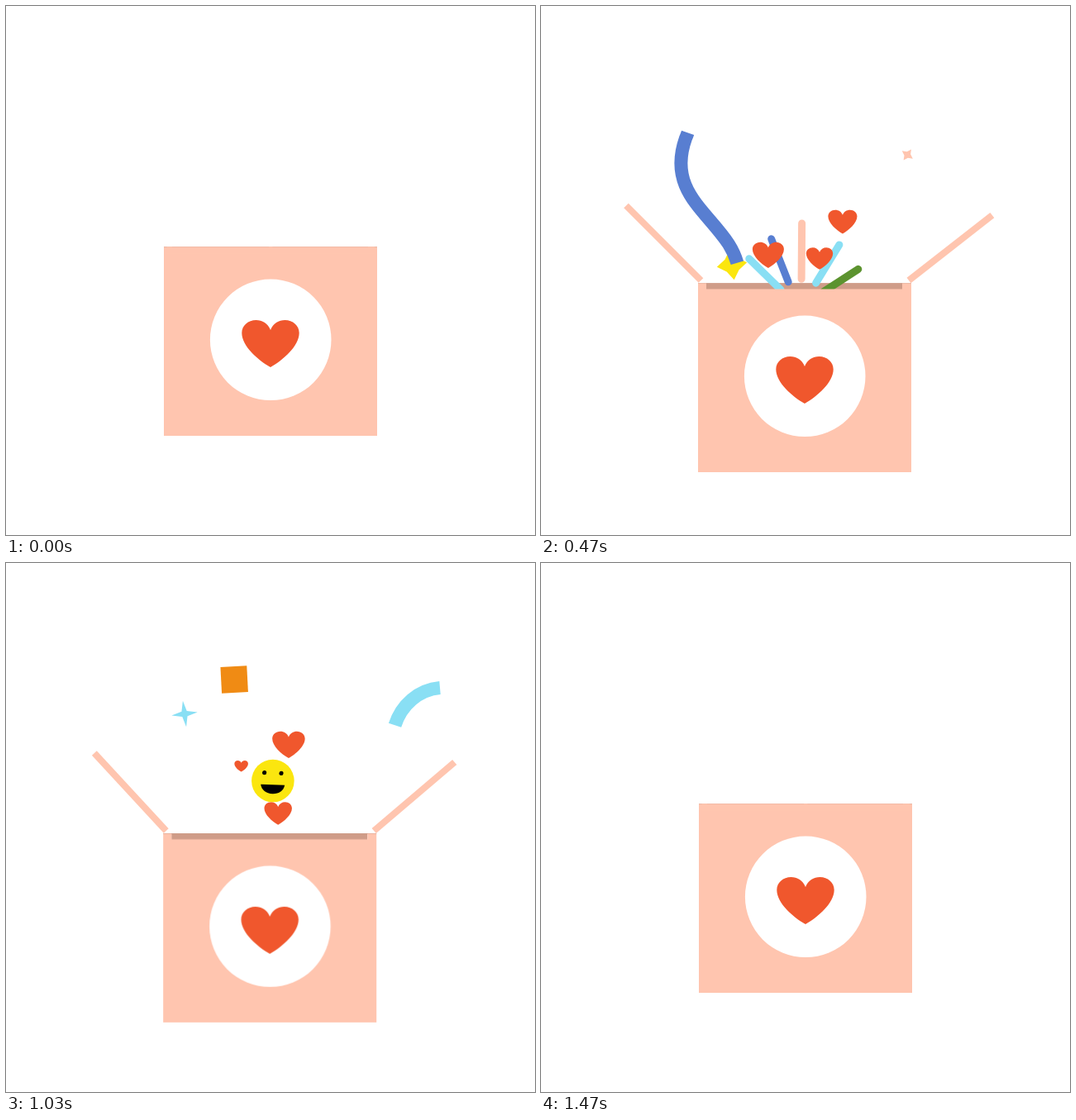
An HTML page for the animation above (1530 ms loop, 640 by 640 pixels).

```html
<!DOCTYPE html>
<html lang="en">
<head>
<meta charset="utf-8">
<title>Gift box</title>
<style>
html, body { margin: 0; height: 100%; overflow: hidden; background: #fff; }
svg { display: block; width: 100vw; height: 100vh; }
svg * { animation: 1530ms linear infinite; }

.red { fill: #f0572d; }
.peach { fill: #ffc5af; }
.cyan { fill: #89dff4; }
.yellow { fill: #fbe60f; }
.dark { fill: #cf9c88; }

/* box and flaps */
.box { animation-name: box; }
.left { animation-name: left; }
.right { animation-name: right; }
@keyframes box {
  0%, 1.3% { translate: 0 0; animation-timing-function: cubic-bezier(.455, .03, .515, .955); }
  26.8% { translate: -1px 44px; }
  62.1% { translate: -1px 44px; animation-timing-function: cubic-bezier(.3, .2, .7, .7); }
  69.9% { translate: -.7px 31.5px; }
  76.5% { translate: -.5px 21px; animation-timing-function: cubic-bezier(.3, .4, .6, 1); }
  94.1%, 100% { translate: 0 0; }
}
@keyframes left {
  0%, 5.6% { translate: 194.5px 295.3px; rotate: 0deg; animation-timing-function: cubic-bezier(.455, .03, .515, .955); }
  27.2% { translate: 194.5px 288px; rotate: -135deg; }
  64.1% { translate: 194.5px 288px; rotate: -135deg; animation-timing-function: cubic-bezier(.4, 0, .7, .55); }
  76.5% { translate: 195px 289.5px; rotate: -107.3deg; animation-timing-function: cubic-bezier(.35, .19, .5, 1); }
  95.4%, 100% { translate: 194.5px 295.3px; rotate: 0deg; }
}
@keyframes right {
  0%, 5.6% { translate: 446px 295.3px; rotate: 0deg; animation-timing-function: cubic-bezier(.455, .03, .515, .955); }
  27.2% { translate: 446px 288px; rotate: 142deg; }
  64.1% { translate: 446px 288px; rotate: 142deg; animation-timing-function: cubic-bezier(.4, 0, .7, .55); }
  76.5% { translate: 446px 289.5px; rotate: 112.8deg; animation-timing-function: cubic-bezier(.35, .19, .5, 1); }
  95.4%, 100% { translate: 446px 295.3px; rotate: 0deg; }
}

/* floating hearts */
.h1 { animation-name: h1; }
.h2 { animation-name: h2; }
.h3 { animation-name: h3; }
.h4 { animation-name: h4; }
.h5 { animation-name: h5; }
@keyframes h1 {
  0%, 7.2% { translate: 358.5px 322px; scale: 0; }
  11.1% { translate: 358.5px 302px; scale: .385; animation-timing-function: ease-out; }
  21.6% { translate: 358.5px 281px; scale: .573; }
  43.8% { translate: 374px 233px; scale: .41; }
  53.6%, 100% { translate: 380px 214px; scale: 0; }
}
@keyframes h2 {
  0%, 15% { translate: 272px 352px; scale: 0; animation-timing-function: ease-out; }
  21.6% { translate: 272px 317px; scale: .54; }
  43.8% { translate: 279px 279px; scale: .56; }
  60.8% { translate: 288px 255px; scale: .39; }
  76.5% { translate: 280px 233px; scale: .03; }
  77.8%, 100% { translate: 280px 232px; scale: 0; }
}
@keyframes h3 {
  0%, 23.5% { translate: 337px 355px; scale: 0; animation-timing-function: ease-out; }
  32.7% { translate: 337px 302px; scale: .5; }
  43.8% { translate: 337px 271.5px; scale: .19; }
  47.1%, 100% { translate: 337px 264px; scale: 0; }
}
@keyframes h4 {
  0%, 36.6% { translate: 308px 378px; scale: 0; }
  43.8% { translate: 317px 336.5px; scale: .6; animation-timing-function: cubic-bezier(.3, .4, .7, .9); }
  60.8% { translate: 333px 238px; scale: .575; animation-timing-function: ease-out; }
  76.5% { translate: 348px 207.5px; scale: .565; animation-timing-function: ease-in; }
  87.6%, 100% { translate: 354px 190px; scale: 0; }
}
@keyframes h5 {
  0%, 52.3% { translate: 325px 375px; scale: 0; animation-timing-function: ease-out; }
  60.8% { translate: 329px 313px; scale: .585; }
  76.5% { translate: 329.5px 289px; scale: .34; }
  82.4%, 100% { translate: 329.5px 282px; scale: 0; }
}

.smile { animation-name: smile; }
@keyframes smile {
  0%, 33% { translate: 315px 390px; }
  43.8% { translate: 319px 288.5px; animation-timing-function: ease-out; }
  56.2% { translate: 323px 245px; animation-timing-function: ease-in; }
  60.8% { translate: 325px 248px; animation-timing-function: cubic-bezier(.4, .15, .7, .6); }
  76.5% { translate: 317.5px 303px; }
  84.3%, 100% { translate: 314px 370px; }
}

/* stars and square */
.s1 { translate: 216px 182.5px; animation-name: s1; }
.s2 { animation-name: s2; }
.s3 { translate: 231px 313px; animation-name: s3; }
.square { animation-name: square; }
@keyframes s1 {
  0%, 30.7% { scale: 0; rotate: -40deg; }
  43.8% { scale: .8; rotate: -21deg; animation-timing-function: ease-out; }
  60.8% { scale: 1; rotate: -13deg; }
  76.5% { scale: .04; rotate: 0deg; }
  77.8%, 100% { scale: 0; rotate: 0deg; }
}
@keyframes s2 {
  0%, 28.1% { translate: 443px 180px; scale: 0; rotate: 40deg; }
  37.3% { translate: 444px 180px; scale: .95; rotate: 25deg; }
  43.8% { translate: 445px 179.5px; scale: 1; rotate: 18deg; }
  60.8% { translate: 448px 179px; scale: .4; rotate: 0deg; }
  65.4%, 100% { translate: 448px 179px; scale: 0; rotate: -5deg; }
}
@keyframes s3 {
  0%, 19% { scale: 0; rotate: 10deg; }
  21.6% { scale: .26; rotate: 5deg; }
  34.6% { scale: 1; rotate: -14deg; }
  43.8% { scale: 1; rotate: -26deg; }
  54.2%, 100% { scale: 0; rotate: -40deg; }
}
@keyframes square {
  0%, 47.1% { translate: 271px 141px; scale: 0; rotate: -58deg; }
  60.8% { translate: 274.5px 141px; scale: 1; rotate: -21deg; }
  76.5% { translate: 278.5px 141px; scale: 1.1; rotate: 22deg; }
  82.4% { translate: 279.5px 141px; scale: 1.2; rotate: 38deg; }
  91.5%, 100% { translate: 281px 141px; scale: 0; rotate: 60deg; }
}

/* trimmed strokes */
.trim path { fill: none; stroke-dasharray: 0 3; }
.rays path { stroke-width: 9; stroke-linecap: round; animation-name: ray; }
.ribbons path { stroke-width: 16; }
.ribbons .r1 { animation-name: r1; }
.ribbons .r2 { animation-name: r2; }
@keyframes ray {
  0%, 19.6% { stroke-dasharray: 0 3; stroke-dashoffset: 0; opacity: 0; animation-timing-function: step-end; }
  19.7% { stroke-dasharray: 0 3; stroke-dashoffset: 0; opacity: 1; }
  21.6% { stroke-dasharray: .09 3; stroke-dashoffset: 0; }
  29.4% { stroke-dasharray: .5 3; stroke-dashoffset: -.05; }
  36.6% { stroke-dasharray: .5 3; stroke-dashoffset: -.4; }
  43.8% { stroke-dasharray: .25 3; stroke-dashoffset: -.75; }
  52.3% { stroke-dasharray: 0 3; stroke-dashoffset: -1; opacity: 1; animation-timing-function: step-start; }
  52.4%, 100% { stroke-dasharray: 0 3; stroke-dashoffset: -1; opacity: 0; }
}
@keyframes r1 {
  0%, 19% { stroke-dasharray: 0 3; stroke-dashoffset: 0; }
  21.6% { stroke-dasharray: .174 3; stroke-dashoffset: 0; }
  28.1% { stroke-dasharray: .5 3; stroke-dashoffset: 0; }
  34.6% { stroke-dasharray: .58 3; stroke-dashoffset: -.25; }
  39.9% { stroke-dasharray: .54 3; stroke-dashoffset: -.46; }
  43.8% { stroke-dasharray: .39 3; stroke-dashoffset: -.61; }
  52.3% { stroke-dasharray: .12 3; stroke-dashoffset: -.88; }
  60.8% { stroke-dasharray: .005 3; stroke-dashoffset: -.995; }
  62.1%, 100% { stroke-dasharray: 0 3; stroke-dashoffset: -1; }
}
@keyframes r2 {
  0%, 36.6% { stroke-dasharray: 0 3; stroke-dashoffset: 0; }
  43.8% { stroke-dasharray: .425 3; stroke-dashoffset: 0; }
  49.7% { stroke-dasharray: .67 3; stroke-dashoffset: -.08; }
  55.6% { stroke-dasharray: .67 3; stroke-dashoffset: -.28; }
  60.8% { stroke-dasharray: .51 3; stroke-dashoffset: -.49; }
  68.6% { stroke-dasharray: .2 3; stroke-dashoffset: -.8; }
  76.5% { stroke-dasharray: .025 3; stroke-dashoffset: -.975; }
  77.8%, 100% { stroke-dasharray: 0 3; stroke-dashoffset: -1; }
}
</style>
</head>
<body>
<svg viewBox="0 0 640 640">
  <defs>
    <path id="heart" d="M0-16.5C3-24.5 10-28.5 17.5-28.5C27-28.5 34.7-22 34.7-13C34.7 3 15 20 0 28.5C-15 20-34.7 3-34.7-13C-34.7-22-27-28.5-17.5-28.5C-10-28.5-3-24.5 0-16.5z"/>
  </defs>

  <g class="box dark">
    <rect x="191" y="291.2" width="258" height="1"/>
    <rect x="201" y="291.5" width="237" height="8"/>
  </g>

  <polygon class="s3 yellow" points="0,-23.5 9.6,-9.6 23.5,0 9.6,9.6 0,23.5 -9.6,9.6 -23.5,0 -9.6,-9.6"/>
  <polygon class="s1 cyan" points="0,-26.5 5.3,-5.3 26.5,0 5.3,5.3 0,26.5 -5.3,5.3 -26.5,0 -5.3,-5.3"/>
  <polygon class="s2 peach" points="0,-29 9.8,-9.8 29,0 9.8,9.8 0,29 -9.8,9.8 -29,0 -9.8,-9.8"/>
  <rect class="square" x="-15.3" y="-15.3" width="30.6" height="30.6" fill="#f08b14"/>

  <g class="trim rays">
    <path pathLength="1" stroke="#ffc5af" d="M315 346L316 211.5"/>
    <path pathLength="1" stroke="#587ed1" d="M304 346L263 242"/>
    <path pathLength="1" stroke="#89dff4" d="M326 346L382.5 253.5"/>
    <path pathLength="1" stroke="#89dff4" d="M299 352L222.5 277"/>
    <path pathLength="1" stroke="#5c932f" d="M332 352L416 297.5"/>
  </g>

  <g class="red">
    <use class="h1" href="#heart"/>
    <use class="h2" href="#heart"/>
    <use class="h3" href="#heart"/>
    <use class="h4" href="#heart"/>
    <use class="h5" href="#heart"/>
  </g>

  <g class="smile">
    <circle class="yellow" r="25.8"/>
    <g transform="rotate(2)">
      <circle cx="-10.6" cy="-9.6" r="2.6"/>
      <circle cx="9.8" cy="-9.6" r="2.6"/>
      <path d="M-14.5 4.6H14.5C13.5 11.5 7.5 15.6 0 15.6S-13.5 11.5-14.5 4.6z"/>
    </g>
  </g>

  <g class="trim ribbons">
    <path class="r1" pathLength="1" stroke="#587ed1" d="M242 345C242 320 236 302 227 288C200 247 153 222 175 160C179 151 181 143 181 133C181 103 146 66 113 73"/>
    <path class="r2" pathLength="1" stroke="#89dff4" d="M339 350C346 312 364 288 395 288C420 288 434 283 447 269.5C460 256 467 238 467 219C467 184 491 154 525 151"/>
  </g>

  <g class="box">
    <path class="peach" d="M191 291.5h10v7h237v-7h11V520H191z"/>
    <circle cx="320.2" cy="403.8" r="73.3" fill="#fff"/>
    <use class="red" href="#heart" x="320" y="408.5"/>
    <rect class="left peach" y="-4" width="128" height="8"/>
    <rect class="right peach" x="-128" y="-4" width="128" height="8"/>
  </g>
</svg>
</body>
</html>
```
